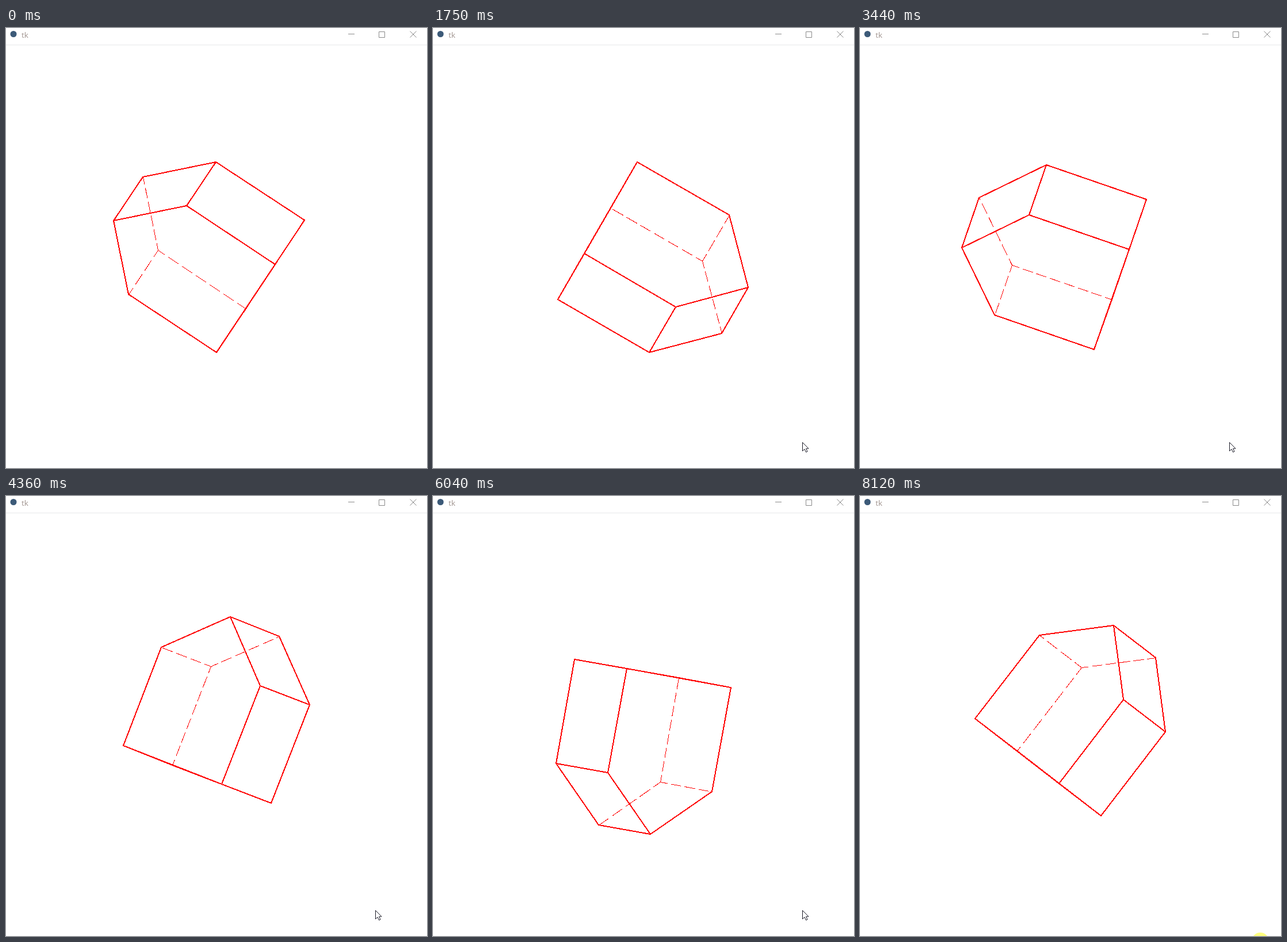
Recreate the animation shown at these times as an HTML page. Size 732 px wide and 765 px high, loop 8.2 s.

```html
<!DOCTYPE html>
<html lang="en">
<head>
<meta charset="utf-8">
<title>tk</title>
<style>
  html, body { margin: 0; width: 100%; height: 100%; overflow: hidden; background: #fff; }
  svg { display: block; }
  text { font: 13.5px "Open Sans", "Noto Sans", sans-serif; fill: #a0948f; }
  .controls { fill: none; stroke: #8a8a8a; }
  .house { fill: none; stroke: #f00; shape-rendering: crispEdges; }
  .solid { stroke-width: 2; stroke-linecap: round; stroke-linejoin: round; }
  .hidden { transform: translate(.5px, .5px); }
</style>
</head>
<body>
<svg width="732" height="765" viewBox="0 0 732 765">
  <circle cx="13" cy="10.5" r="5.5" fill="#3c5a78"/>
  <text x="27" y="17">tk</text>
  <path d="M0 29.5H732" stroke="#e6e8ea"/>
  <g class="controls">
    <path d="M595 10.5H606M648.5 6.5h10v10h-10z"/>
    <path d="M702.5 5.5l11 11m0-11l-11 11"/>
  </g>
  <g class="house" id="house"></g>
  <path id="cursor" d="M.5 .5V15.5L4 12.2L6.5 17.5L9 16.4L6.6 11.2H11Z" fill="#fff" stroke="#1c1c28"/>
  <circle id="click" cx="696" cy="774" r="15" fill="#ffff80"/>
</svg>
<script>
const LOOP = 8200;
const STEP_MS = 76.6;
const STEP_LEAD = 0.25;
const LAST_STEP = 106;
const START_ANGLE = -56.5;
const STEP_ANGLE = 7.68;
const UNIT = 92;
const CENTER = { x: 365.7, y: 398.6 };

const house = document.getElementById('house');
const cursor = document.getElementById('cursor');
const click = document.getElementById('click');

// Vertices relative to the pivot: base 0-3, eaves 4-7, ridge 8-9
const row = y => [-1.5, -0.5, 0.5, 1.5].map(x => [x, y]);
const VERTICES = [...row(-1), ...row(1), [-0.5, 2], [0.5, 2]];

function addEdges(className, vertices) {
  const element = document.createElementNS('http://www.w3.org/2000/svg', 'polyline');
  element.setAttribute('class', className);
  house.appendChild(element);
  return { element, vertices };
}

const hidden = [1, 4, 9].map(end => addEdges('hidden', [5, end]));
const frontFace = addEdges('solid', [0, 2, 6, 8, 4, 0]);
const backFace = addEdges('solid', [1, 3, 7, 9]);
const joints = [0, 2, 6, 8].map(i => addEdges('solid', [i, i + 1]));
const edges = [...hidden, frontFace, backFace, ...joints];

function project(angle) {
  const ux = UNIT * Math.cos(angle), uy = UNIT * Math.sin(angle);
  return VERTICES.map(([x, y]) => [
    Math.round(CENTER.x + x * ux + y * uy),
    Math.round(CENTER.y + x * uy - y * ux)
  ]);
}

// Dashes are counted in pixels along the longer axis
function setDash(element, [x1, y1], [x2, y2]) {
  const dx = Math.abs(x2 - x1), dy = Math.abs(y2 - y1);
  const scale = Math.hypot(dx, dy) / Math.max(dx, dy);
  element.setAttribute('stroke-dasharray', `${18 * scale} ${6 * scale}`);
  element.setAttribute('stroke-dashoffset', 6 * scale);
}

function show(element, visible) {
  element.style.display = visible ? '' : 'none';
}

function render(time) {
  const step = Math.min(LAST_STEP, Math.floor(time / STEP_MS + STEP_LEAD));
  const points = project((START_ANGLE + STEP_ANGLE * step) * Math.PI / 180);

  for (const { element, vertices } of edges) {
    element.setAttribute('points', vertices.map(i => points[i]).join(' '));
  }
  for (const { element, vertices: [a, b] } of hidden) {
    setDash(element, points[a], points[b]);
  }

  show(cursor, time >= 450 && time < 7040);
  cursor.setAttribute('transform', time < 1290 ? 'translate(631 714)' : 'translate(642 720)');
  show(click, step === LAST_STEP);
}

const start = performance.now();
function tick() {
  render((performance.now() - start) % LOOP);
  requestAnimationFrame(tick);
}
tick();
</script>
</body>
</html>
```
